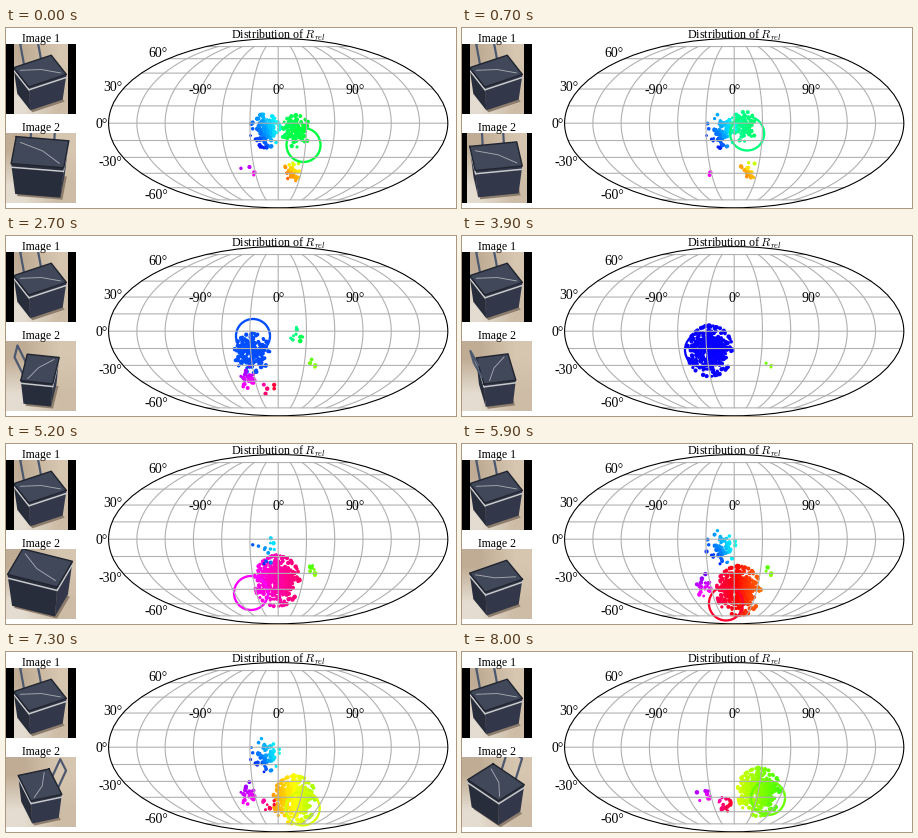
A matplotlib script that plays this animation: 450 by 180 pixels, repeating every 8.1 s.

```python
import colorsys

import numpy as np
import matplotlib.pyplot as plt
from matplotlib.animation import FuncAnimation
from matplotlib.patches import Circle, Ellipse, Polygon, Rectangle

W, H, DPI = 450, 180, 100
FRAMES, INTERVAL = 81, 100
PT = 72 / DPI
CX, CY, RX, RY = 272.2, 95.2, 169.6, 84.6
PIVOT = np.array([272, 130])  # centre of the ring's orbit on the globe
REST = 14                     # frame at which both views agree

plt.rcParams["font.family"] = "Liberation Serif"
plt.rcParams["mathtext.fontset"] = "cm"

fig = plt.figure(figsize=(W / DPI, H / DPI), dpi=DPI, facecolor="white")
ax = fig.add_axes([0, 0, 1, 1])
ax.axis("off")

# Key points of the camera's orbit
KEYS = np.array([0, 14, 27, 39, 52, 66, 80])
TURN = np.array([-34, 0, 54, 74, 132, 230, 287])
RING = np.array([[297.5, 117], [272.5, 97], [247, 100], [240, 114],
                 [245, 149], [285, 163], [306, 146]])
CLOUD = np.array([[290, 103], [272, 97], [246, 117], [248, 115],
                  [271, 137], [281, 152], [297, 140]])
CLOUD_SIZE = [130, 90, 230, 430, 430, 380, 380]


def ease(frame, values):
    """Cubic Hermite curve through the values at KEYS."""
    slopes = np.gradient(values, KEYS, axis=0)
    i = min(np.searchsorted(KEYS, frame, side="right") - 1, len(KEYS) - 2)
    span = KEYS[i + 1] - KEYS[i]
    u = (frame - KEYS[i]) / span
    return ((2*u**3 - 3*u**2 + 1) * values[i] + (u**3 - 2*u**2 + u) * span * slopes[i]
            + (3*u**2 - 2*u**3) * values[i + 1] + (u**3 - u**2) * span * slopes[i + 1])


rng = np.random.default_rng(7)


def unit_cloud(n):
    """Gaussian offsets pulled back onto the unit disc."""
    off = rng.normal(0, 0.47, (n, 2))
    return off / np.maximum(np.hypot(*off.T), 1)[:, None]


def spread(n):
    radius = 4 + 0.9 * np.sqrt(n)
    return np.array([radius, 1.12 * radius])


def orbit_hue(points):
    """Hue follows the direction from the pivot, counted from the top."""
    dx, dy = (points - PIVOT).T
    return 178 + np.degrees(np.arctan2(-dx, -dy))


def rgb(hue):
    return colorsys.hsv_to_rgb(hue / 360 % 1, 1, 1)


main_dots = unit_cloud(max(CLOUD_SIZE))
spots = []


def add_spot(x, y, peaks):
    """A fixed cloud; peaks maps a key frame to its number of dots."""
    n = max(peaks.values())
    points = np.array([x, y]) + unit_cloud(n) * spread(n)
    spots.append((points, [peaks.get(int(k), 0) for k in KEYS]))


add_spot(259, 103, {0: 150, 52: 13, 66: 130})
add_spot(287, 144, {0: 36})
add_spot(242, 141, {0: 4, 27: 26, 66: 42, 80: 8})
add_spot(290, 99, {27: 10})
add_spot(308, 128, {27: 4, 39: 3, 52: 9})
add_spot(262, 154, {27: 5, 80: 17})


def label(x, y, text, px, ha="center"):
    ax.text(x, y + 0.7, text, fontsize=px * PT, ha=ha, va="baseline", zorder=8)


def mollweide(lat):
    """Half-width and height of a parallel, as shares of the globe's radii."""
    lat = np.radians(lat)
    theta = np.array(lat, dtype=float)
    for _ in range(12):
        theta -= (2*theta + np.sin(2*theta) - np.pi*np.sin(lat)) / (2 + 2*np.cos(2*theta))
    return np.cos(theta), np.sin(theta)


def draw_globe():
    grid = dict(color="#b0b0b0", lw=1.1 * PT, zorder=5, snap=False)
    wide, high = mollweide(np.linspace(-75, 75, 61))
    for lon in range(-150, 180, 30):
        ax.plot(CX + RX * lon / 180 * wide, CY - RY * high, **grid)
    for lat in range(-75, 90, 15):
        wide, high = mollweide(lat)
        ax.plot([CX - RX * wide, CX + RX * wide], [CY - RY * high] * 2, **grid)
    outline = Ellipse((CX, CY), 2*RX, 2*RY, fill=False, ec="black", lw=1.1 * PT, zorder=6)
    ax.add_patch(outline)
    for lat in range(-60, 90, 30):
        wide, high = mollweide(lat)
        label(CX - RX * wide - 0.5, CY + 4.5 - 1.1 * RY * high, f"{lat}°", 13.8, "right")
    for lon in (-90, 0, 90):
        label(CX + 0.86 * lon, 65, f"{lon}°", 13.8)
    label(CX + 0.3, 10, "Distribution of $R_{rel}$", 12)
    return outline


FLOOR = np.array([[[192, 172, 148], [214, 198, 176]],
                  [[228, 220, 208], [205, 188, 166]]]) / 255
NAVY, SIDE, LID, RIM, METAL = "#282d3c", "#323849", "#414859", "#c9cacc", "#4c5870"


def draw_photo(frame, top):
    """Flat sketch of a trolley bag seen from a circling camera."""
    angle = np.radians(117 + ease(frame, TURN))
    scale = 1.08 + 0.34 * np.cos(angle - np.radians(75)) ** 8
    center = np.array([34, top + 28 - 28 * (scale - 1.08)])
    ahead = np.array([np.cos(angle), np.sin(angle)])
    across = np.array([ahead[1], -ahead[0]])
    artists = [ax.imshow(FLOOR, extent=(0, 70, top + 70, top), aspect="auto",
                         interpolation="bilinear", zorder=1)]
    ax.set(xlim=(0, W), ylim=(H, 0))

    def project(u, v, z=0, taper=1):
        x, y = (u * 19 * across + v * 15 * ahead) * taper
        return center + scale * np.array([x, -0.65 * y - z])

    def shape(points, color):
        artists.append(ax.add_patch(Polygon(points, fc=color, lw=0, zorder=2)))

    def line(points, color, width):
        artists.extend(ax.plot(*np.transpose(points), color=color, lw=width * PT, zorder=2))

    corners = [(-1, 1), (1, 1), (1, -1), (-1, -1)]
    lid = [project(*c) for c in corners]
    base = [project(*c, z=-23, taper=0.86) for c in corners]
    handle = [project(-0.45, 1), project(-0.45, 1.5, 14),
              project(0.45, 1.5, 14), project(0.45, 1)]
    if ahead[1] > 0:
        line(handle, METAL, 2.2)
    shape([p + [2, 2] for p in base], "#8d7d6c")
    for i, normal in enumerate([ahead, across, -ahead, -across]):
        if normal[1] < 0:
            j = (i + 1) % 4
            shape([lid[i], lid[j], base[j], base[i]], NAVY if normal[0] < 0 else SIDE)
            line([0.88 * lid[k] + 0.12 * base[k] for k in (i, j)], RIM, 1.5)
    shape(lid, LID)
    line(lid + lid[:1], "#20242f", 1.4)
    line([project(-0.8, 0.6), project(0.1, 0.1), project(0.8, -0.7)], "#a5a9b0", 0.9)
    if -0.7 < ahead[1] <= 0:
        line(handle, METAL, 2.2)
    window = Rectangle((0, top), 70, 70, transform=ax.transData)
    for artist in artists[1:]:
        artist.set_clip_path(window)

    bar = np.clip(12 - abs(frame - REST), 0, 8)
    for x in (0, 70 - bar):
        artists.append(ax.add_patch(Rectangle((x, top), bar, 70, fc="black", lw=0, zorder=3)))
    return artists


def draw_dots(frame):
    ring = ease(frame, RING)
    ring_hue = 168 + ease(frame, TURN)
    middle = ease(frame, CLOUD)
    count = int(np.interp(frame, KEYS, CLOUD_SIZE))
    points = middle + main_dots[:count] * spread(count)
    hues = ring_hue + (points[:, 0] - ring[0]) * (middle[1] - 115) / 30
    for places, counts in spots:
        lit = places[:int(np.interp(frame, KEYS, counts))]
        points = np.vstack([points, lit])
        hues = np.append(hues, orbit_hue(lit))

    sizes = (3.7 * PT * np.random.default_rng(3).uniform(0.75, 1.25, len(points))) ** 2
    peak = 20.3 * np.exp(-((frame - REST) / 2.2) ** 2)
    color = rgb(ring_hue)
    artists = [
        ax.scatter(*points.T, s=sizes, c=[rgb(h) for h in hues], lw=0, zorder=4),
        ax.add_patch(Circle(ring, 17, fill=False, ec=color, lw=2.3 * PT, zorder=4)),
        ax.add_patch(Circle(ring, peak, fc=color, lw=0, zorder=4)),
    ]
    for artist in artists:
        artist.set_clip_path(outline)
    return artists


outline = draw_globe()
label(34.5, 13, "Image 1", 11.8)
label(34.5, 102, "Image 2", 11.8)
draw_photo(REST, 16)
moving = []


def update(frame):
    while moving:
        moving.pop().remove()
    moving.extend(draw_photo(frame, 105) + draw_dots(frame))
    return moving


anim = FuncAnimation(fig, update, frames=FRAMES, interval=INTERVAL,
                     init_func=lambda: [], repeat=True, repeat_delay=0, blit=False)
plt.show()
```
